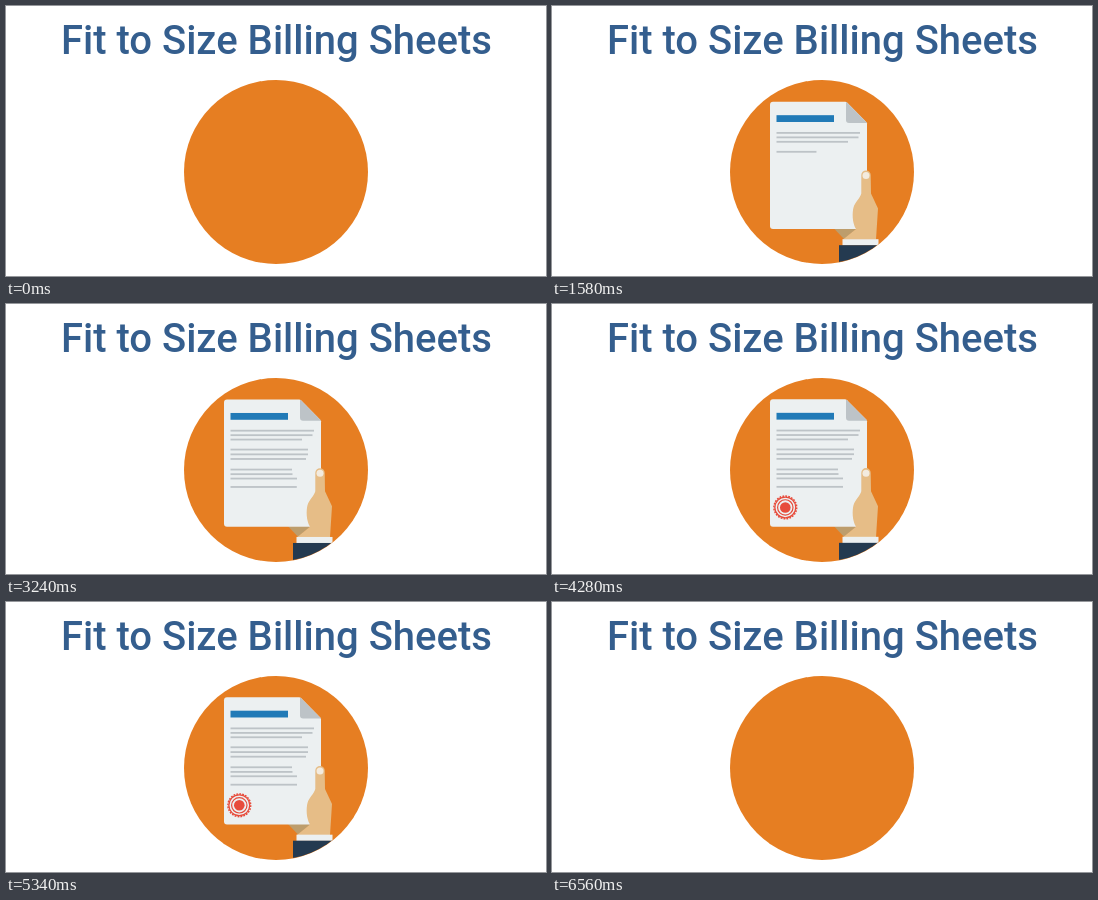
An HTML page that plays this animation: 540x270 px, repeating every 7200 ms.

```html
<!DOCTYPE html>
<html lang="en">
<head>
<meta charset="utf-8">
<title>Fit to Size Billing Sheets</title>
<style>
  html, body { margin: 0; width: 100%; height: 100%; overflow: hidden; background: #fff; }
  svg { display: block; width: 540px; height: 270px; }
  text { font: 500 40px Roboto, sans-serif; fill: #345e8e; text-anchor: middle; }
</style>
</head>
<body>
<svg viewBox="0 0 540 270">
  <defs>
    <clipPath id="disc"><circle cx="270" cy="166" r="91.6"/></clipPath>
  </defs>
  <text x="270.5" y="47.6">Fit to Size Billing Sheets</text>
  <circle cx="270" cy="166" r="92" fill="#e67e22"/>
  <g clip-path="url(#disc)">
    <g id="scene">
      <path d="M282 222 H305 L292 232.5 Z" fill="#bd9d6c"/>
      <path d="M221 95.1 H293.4 L295 95.9 L314.2 115.3 L315 117 V219.5 Q315 222.5 312 222.5 H221 Q218 222.5 218 219.5 V98.1 Q218 95.1 221 95.1 Z" fill="#ecf0f1"/>
      <path d="M294 95.3 L295 95.9 L314.2 115.3 L315 116.5 H297 Q294 116.5 294 113.5 Z" fill="#bdc3c7"/>
      <rect id="bar" x="224.5" y="108.6" height="6.8" fill="#217ab7"/>
      <g id="lines" fill="#bdc3c7"></g>
      <g id="seal" fill="none" stroke="#e74c3c">
        <circle cx="233.3" cy="203.2" r="10.4" stroke-width="1.2"/>
        <circle cx="233.3" cy="203.2" r="11.4" stroke-width="1.5" pathLength="48" stroke-dasharray="1.2 .8"/>
        <circle cx="233.3" cy="203.2" r="7.7" stroke-width="1.2"/>
        <circle cx="233.3" cy="203.2" r="5.3" fill="#e74c3c" stroke="none"/>
      </g>
      <path d="M309.3 168.5 A4.7 4.7 0 0 1 318.7 168.5 L319 187 L326 202 L324 233 H291 L304 222.5 C300 216 300.2 206 301.5 201 C303 195.5 308 192 309.3 187 Z" fill="#e6bd87"/>
      <circle cx="314" cy="169" r="3.5" fill="#f3ebdf"/>
      <rect x="290.5" y="232.6" width="36" height="6.2" fill="#ecf0f1"/>
      <rect x="287" y="238.6" width="60" height="30" fill="#243a50"/>
    </g>
  </g>
</svg>
<script>
const LOOP = 7200, STEP = 250, DRAW = 505, LEFT = 224.5;
const RISE = 80, FALL = 5780, MOVE = 800, TRAVEL = 200;
const $ = id => document.getElementById(id);
const clamp = v => Math.min(1, Math.max(0, v));
const easeOut = p => 1 - (1 - p) ** 2;
const grow = (t, start, len) => easeOut(clamp((t - start) / len));

// y and right end of each text line
const rows = [
  [126.3, 308], [130.8, 306.5], [135.2, 296],
  [145.2, 302], [150, 302], [154.6, 300],
  [165.2, 286], [169.8, 286.5], [174.2, 291], [182.6, 291]
].map(([y, end]) => {
  const el = document.createElementNS('http://www.w3.org/2000/svg', 'rect');
  el.setAttribute('x', LEFT);
  el.setAttribute('y', y - 0.9);
  el.setAttribute('height', 1.8);
  $('lines').append(el);
  return { el, width: end - LEFT };
});

function offset(t) {
  const up = clamp((t - RISE) / MOVE), down = clamp((t - FALL) / MOVE);
  const drift = 0.8 * (1 - clamp(t / 6000));
  const rise = up < 1 ? 2 ** (-10 * up) : 0;
  const fall = down > 0 ? 2 ** (10 * (down - 1)) : 0;
  return TRAVEL * (rise + fall) + drift;
}

function render(t) {
  $('scene').setAttribute('transform', `translate(0 ${offset(t).toFixed(3)})`);
  $('bar').setAttribute('width', 57.5 * grow(t, DRAW, STEP));
  rows.forEach(({ el, width }, i) =>
    el.setAttribute('width', width * grow(t, DRAW + STEP * (i + 1), STEP)));
  $('seal').setAttribute('opacity', grow(t, DRAW + STEP * 11, 1000));
}

const begin = performance.now();
function tick() {
  render((performance.now() - begin) % LOOP);
  requestAnimationFrame(tick);
}
render(0);
requestAnimationFrame(tick);
</script>
</body>
</html>
```
